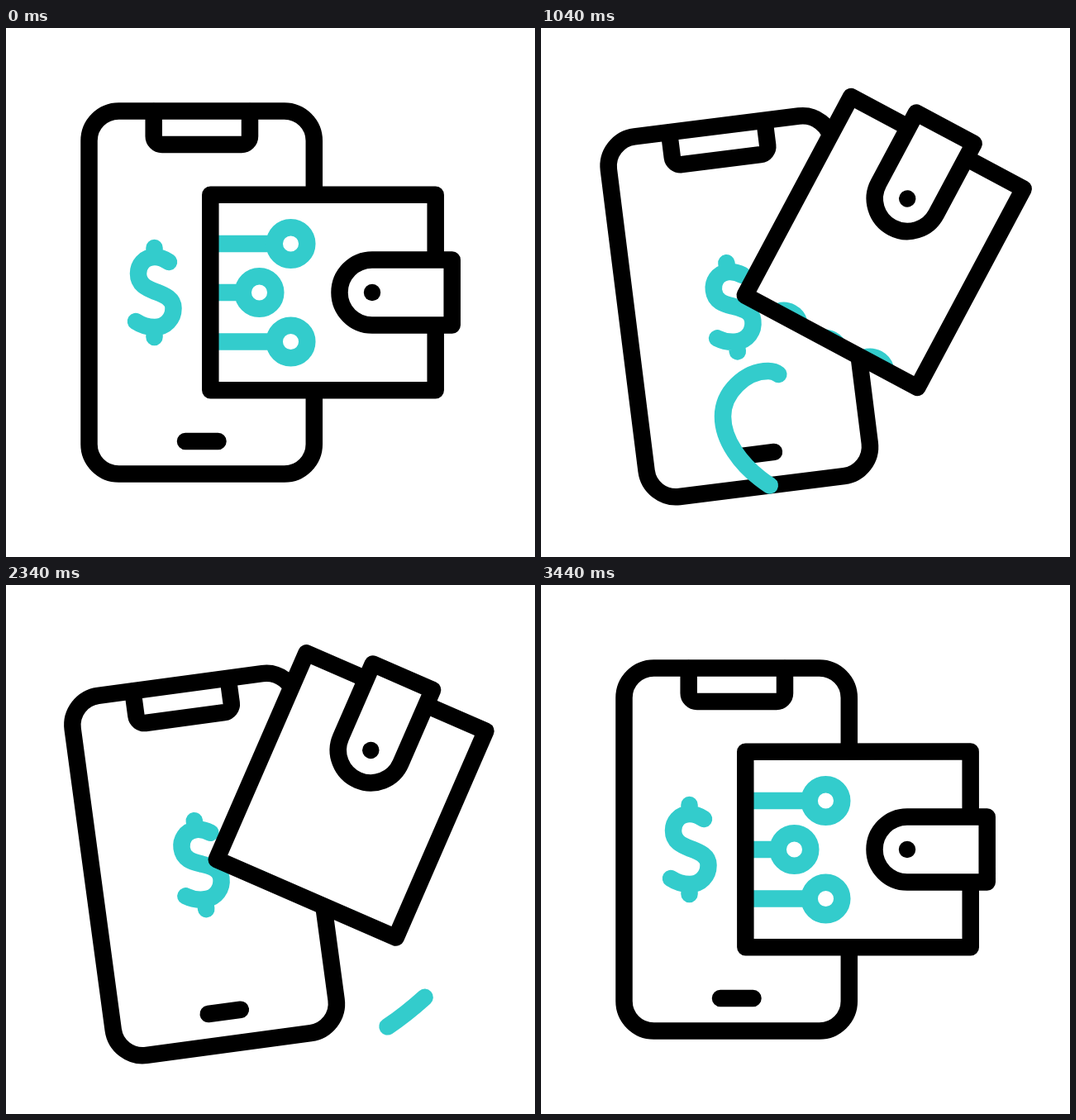
An HTML page with a canvas that plays this animation: 640x640 px, repeating every 3.6 s.

```html
<!DOCTYPE html>
<html lang="en">
<head>
<meta charset="utf-8">
<title>Phone wallet</title>
<style>
  html, body { margin: 0; width: 100%; height: 100%; overflow: hidden; background: #fff; }
  canvas { display: block; width: 640px; height: 640px; }
</style>
</head>
<body>
<canvas id="stage" width="640" height="640"></canvas>
<script>
const ctx = document.getElementById('stage').getContext('2d');
const LOOP = 3600, STEP = 20;
const BLACK = '#000', CYAN = '#33cccc', WHITE = '#fff';

const phone = new Path2D('M136.5 100.5H336.8A36 36 0 0 1 372.8 136.5V503.5A36 36 0 0 1 336.8 539.5H136.5A36 36 0 0 1 100.5 503.5V136.5A36 36 0 0 1 136.5 100.5Z');
const phoneDetails = new Path2D('M178.7 101V131A10 10 0 0 0 188.7 141H285A10 10 0 0 0 295 131V101M217 500H256.5');
const dollar = new Path2D('M197 283C191 279 186 277 180 277C167 277 160 287 160 297C160 311 171 315 181 319C191 323 202.5 327 202.5 339C202.5 352 193 362 180 362C170 362 163 359 157 355M179.5 266V277M179.5 363V374');
const wallet = new Path2D('M247.3 201.7H519.7V438.3H247.3Z');
const flap = new Path2D('M443 280.5H539.7V359.5H443A39.5 39.5 0 0 1 443 280.5Z');

const swooshData = 'M57.5 390C74 454 135 490 203 490C240 490 268 481 285 465C297 454 302 415 275 415C247 415 220 441 220 470C220 500 243 528 265 545C288 563 318 576 350 576C392 576 430 556 459 536C479 523 498 507 513 493L530 476';
const swoosh = new Path2D(swooshData);
const measure = document.createElementNS('http://www.w3.org/2000/svg', 'path');
measure.setAttribute('d', swooshData);
const swooshLength = measure.getTotalLength();

// x, y and retraction distance of each circuit node
const nodes = [[344.5, 261, 125], [306.5, 320, 88], [344.5, 379.5, 125]];

const span = (t, from, to) => Math.min(1, Math.max(0, (t - from) / (to - from)));
const smooth = u => u * u * (3 - 2 * u);

// Cubic-bezier easing with flat ends: handles at (a, 0) and (b, 1)
function bezierEase(u, a, b) {
  if (u <= 0 || u >= 1) return u;
  let lo = 0, hi = 1;
  for (let i = 0; i < 30; i++) {
    const m = (lo + hi) / 2, n = 1 - m;
    if (3 * a * m * n * n + 3 * b * m * m * n + m * m * m < u) lo = m;
    else hi = m;
  }
  return smooth(lo);
}

function poseAt(t) {
  if (t < 1650) return {
    open: bezierEase(span(t, 45, 1550), 0.83, 0.24),
    head: smooth(span(t, 358, 1495)),
    tail: smooth(span(t, 672, 1522))
  };
  return {
    open: 1 - bezierEase(span(t, 1740, 3480), 0.985, 0.265),
    head: 1 - Math.pow(span(t, 2180, 3320), 1.63),
    tail: 1 - smooth(span(t, 2198, 2885))
  };
}

function rotateAbout(x, y, degrees) {
  ctx.translate(x, y);
  ctx.rotate(degrees * Math.PI / 180);
  ctx.translate(-x, -y);
}

function stroke(path, color, width = 20.5) {
  ctx.strokeStyle = color;
  ctx.lineWidth = width;
  ctx.stroke(path);
}

function fill(path, color) {
  ctx.fillStyle = color;
  ctx.fill(path);
}

function circle(x, y, r) {
  const path = new Path2D();
  path.arc(x, y, r, 0, Math.PI * 2);
  return path;
}

function drawPhone(open) {
  ctx.save();
  rotateAbout(372.5, 303, -8.2 * open);
  stroke(phone, BLACK);
  stroke(phoneDetails, BLACK);
  ctx.translate(55.5 * open, 0);
  stroke(dollar, CYAN);
  ctx.restore();
}

function drawSwoosh(head, tail) {
  if (head - tail < 0.001) return;
  ctx.save();
  ctx.setLineDash([(head - tail) * swooshLength, swooshLength * 2]);
  ctx.lineDashOffset = -tail * swooshLength;
  stroke(swoosh, CYAN);
  ctx.restore();
}

function drawCircuit(open) {
  ctx.save();
  ctx.clip(wallet);
  for (const [x, y, retract] of nodes) {
    const nodeX = x - retract * open;
    const wire = new Path2D();
    wire.moveTo(nodeX - 200, y);
    wire.lineTo(nodeX - 20, y);
    stroke(wire, CYAN);
    const ring = circle(nodeX, y, 19.8);
    fill(ring, WHITE);
    stroke(ring, CYAN);
  }
  ctx.restore();
}

function drawWallet(open) {
  ctx.save();
  ctx.translate(36.4 * open, -70 * open);
  rotateAbout(383.5, 320, -71 * open);
  fill(wallet, WHITE);
  drawCircuit(open);
  stroke(wallet, BLACK);
  fill(flap, WHITE);
  stroke(flap, BLACK);
  fill(circle(443, 320, 10.2), BLACK);
  ctx.restore();
}

function draw(now) {
  const t = Math.floor((now % LOOP) / STEP) * STEP;
  const { open, head, tail } = poseAt(t);
  ctx.fillStyle = WHITE;
  ctx.fillRect(0, 0, 640, 640);
  ctx.lineCap = ctx.lineJoin = 'round';
  drawPhone(open);
  drawSwoosh(head, tail);
  drawWallet(open);
}

const start = performance.now();
function tick() {
  draw(performance.now() - start);
  requestAnimationFrame(tick);
}
tick();
</script>
</body>
</html>
```
